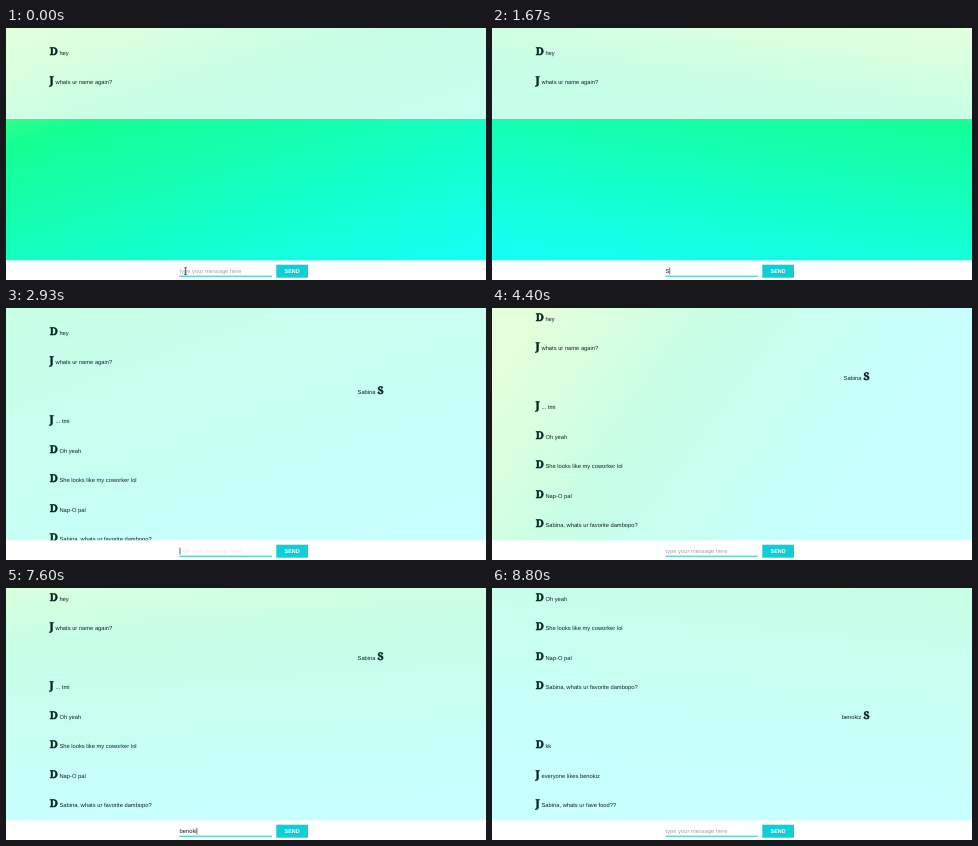
Animation, 480 px wide and 252 px high, one loop 8940 ms. Source, as an HTML page:

```html
<!DOCTYPE html>
<html lang="en">
<head>
<meta charset="utf-8">
<title>Group chat</title>
<style>
  html, body { margin: 0; width: 100%; height: 100%; overflow: hidden; }
  #sky, svg { position: absolute; inset: 0; width: 100%; height: 100%; display: block; }
  text { font: 5.78px "Liberation Sans", Arial, sans-serif; fill: #0b2622; text-rendering: geometricPrecision; }
  .badge { font: 900 10.6px "Noto Serif", serif; fill: #052420; stroke: #052420; stroke-width: .45; }
  .end { text-anchor: end; }
  .send { font-size: 5.4px; font-weight: bold; fill: #fff; text-anchor: middle; }
  #hint { fill: #a3a3a3; }
</style>
</head>
<body>
<div id="sky"></div>
<svg viewBox="0 0 480 252" preserveAspectRatio="none">
  <rect id="panel" width="480" fill="#fff" fill-opacity=".766"/>
  <g id="chat"></g>
  <rect y="232.3" width="480" height="20" fill="#fff"/>
  <text id="hint" x="173.6" y="245">type your message here</text>
  <text id="typed" x="173.6" y="245"></text>
  <rect id="caret" y="239.6" width=".7" height="6.8" fill="#333"/>
  <path id="pointer" d="M178.3 239.8h2.6M178.3 246.6h2.6M179.6 239.8v6.8" stroke="#333" stroke-width=".8"/>
  <rect x="173.4" y="247.7" width="92.5" height="1" fill="#12c9cc"/>
  <rect x="270.3" y="236.7" width="31.7" height="13" fill="#0cd0d5"/>
  <text class="send" x="286.1" y="245.1">SEND</text>
</svg>
<script>
const LOOP = 8940, ROW = 29.5;
const byId = id => document.getElementById(id);

// [time shown, badge, words]
const messages = [
  [0, 'D', 'hey'],
  [0, 'J', 'whats ur name again?'],
  [2730, 'S', 'Sabina'],
  [2870, 'J', '... tmi'],
  [2870, 'D', 'Oh yeah'],
  [2870, 'D', 'She looks like my coworker lol'],
  [2870, 'D', 'Nap-O pal'],
  [2870, 'D', 'Sabina, whats ur favorite dambopo?'],
  [8150, 'S', 'benokiz'],
  [8270, 'D', 'kk'],
  [8270, 'J', 'everyone likes benokiz'],
  [8270, 'J', 'Sabina, whats ur fave food??']
];

const entries = [
  { word: 'Sabina', keys: [1600, 1930, 2070, 2200, 2400, 2530], sent: 2730 },
  { word: 'benokiz', keys: [6700, 6900, 7070, 7270, 7400, 7530, 7730], sent: 8150 }
];

// [time, angle, lime stop, green stop, cyan stop]
const skySteps = [
  [0, 163, 0, 30, 100],
  [1670, 187, 0, 29, 98],
  [2930, 160, -40, 0, 85],
  [4400, 126, 8, 35, 72],
  [5600, 156, 0, 33, 87],
  [7600, 176, -12, 20, 82],
  [8200, 180, -14, 18, 80],
  [8400, 184, -45, 0, 70],
  [LOOP, 186, -45, 0, 70]
];
const scrollSteps = [[0, 0], [2990, 0], [3200, 14], [8280, 14], [8400, 132], [LOOP, 132]];

const badgeX = { D: 43.8, J: 43.5, S: 377.8 };
const wordsX = { D: 53.4, J: 49.5, S: 369.5 };

function addText(parent, x, y, content, className) {
  const node = document.createElementNS('http://www.w3.org/2000/svg', 'text');
  node.setAttribute('x', x);
  node.setAttribute('y', y);
  node.setAttribute('class', className);
  node.textContent = content;
  parent.append(node);
  return node;
}

const rows = messages.map(([time, badge, words], i) => {
  const y = 26.8 + ROW * i, align = badge === 'S' ? 'end' : '';
  return { time, nodes: [
    addText(byId('chat'), badgeX[badge], y - 0.1, badge, 'badge ' + align),
    addText(byId('chat'), wordsX[badge], y, words, align)
  ] };
});

function sample(steps, t) {
  const next = Math.max(1, steps.findIndex(step => step[0] > t));
  const a = steps[next - 1], b = steps[next];
  const k = (t - a[0]) / (b[0] - a[0]);
  return a.slice(1).map((v, i) => v + (b[i + 1] - v) * k);
}

const show = (node, on) => node.setAttribute('visibility', on ? 'visible' : 'hidden');

function drawInput(t) {
  const entry = entries.find(e => t >= e.keys[0] && t < e.sent);
  const count = entry ? entry.keys.filter(key => key <= t).length : 0;
  const typed = byId('typed');
  typed.textContent = entry ? entry.word.slice(0, count) : '';

  const lastAction = Math.max(930, ...entries.flatMap(e => [...e.keys, e.sent]).filter(time => time <= t));
  const width = count ? typed.getComputedTextLength() : 0;
  byId('caret').setAttribute('x', 173.6 + width);
  show(byId('caret'), t >= 930 && (t - lastAction) % 1000 < 500);
  show(byId('pointer'), t < 930);

  const sent = entries.map(e => e.sent).filter(time => time <= t).pop();
  const fade = sent ? Math.min(1, Math.max(0, (t - sent - 130) / 300)) : 1;
  show(byId('hint'), !count);
  byId('hint').setAttribute('opacity', fade);
}

function draw(t) {
  const [angle, lime, green, cyan] = sample(skySteps, t);
  byId('sky').style.background = `linear-gradient(${angle}deg, rgb(140,255,105) ${lime}%, ` +
    `rgb(20,255,148) ${green}%, rgb(20,255,255) ${cyan}%)`;

  const [scroll] = sample(scrollSteps, t);
  const visible = rows.filter(row => row.time <= t).length;
  rows.forEach((row, i) => row.nodes.forEach(node => show(node, i < visible)));
  byId('chat').setAttribute('transform', `translate(0 ${-scroll})`);
  byId('panel').setAttribute('height', 32 + ROW * visible - scroll);
  drawInput(t);
}

const start = performance.now();
function tick() {
  draw((performance.now() - start) % LOOP);
  requestAnimationFrame(tick);
}
tick();
</script>
</body>
</html>
```
